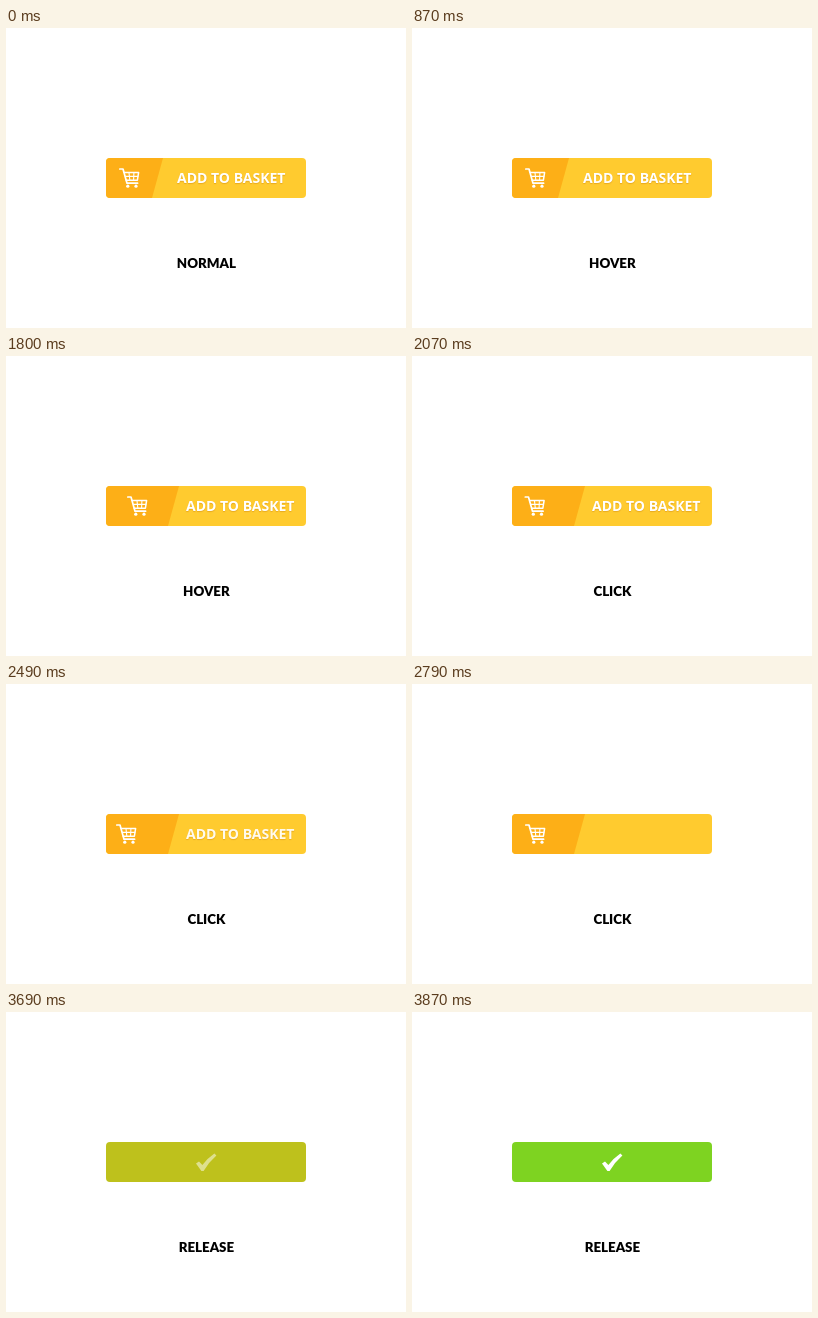
Recreate the animation shown at these times as an HTML page. Size 400 px wide and 300 px high, loop 4530 ms.

```html
<!DOCTYPE html>
<html lang="en">
<head>
<meta charset="utf-8">
<title>Add to basket button</title>
<style>
  html, body { margin: 0; width: 100%; height: 100%; overflow: hidden; background: #fff; }
  svg { display: block; width: 400px; height: 300px; }
  #caption { font: 700 14px "Open Sans", sans-serif; fill: #fff; text-shadow: 0 1px 1px rgba(190, 110, 0, .35); }
  #state { font: 900 13.3px Lato, sans-serif; fill: #000; text-anchor: middle; }
  #cart { fill: none; stroke: #fff; stroke-linejoin: round; stroke-linecap: round; }
</style>
</head>
<body>
<svg viewBox="0 0 400 300">
  <defs>
    <clipPath id="shape"><rect x="100" y="130" width="200" height="40" rx="4"/></clipPath>
  </defs>
  <g clip-path="url(#shape)">
    <rect id="base" x="100" y="130" width="200" height="40"/>
    <path id="panel" d="M80 130H157L146 170H80Z" fill="#fdaf17"/>
    <g id="cart">
      <path d="M.8 1H4L8 15.2H18.6" stroke-width="1.7"/>
      <path d="M5.2 4.6H19.6L18.4 12.2H7.2" stroke-width="1.5"/>
      <path d="M6.4 8.4H18.8M10 4.6L10.8 12M14.9 4.6L14.6 12" stroke-width="1.1"/>
      <circle cx="8.8" cy="18.2" r="1.6" fill="#fff" stroke="none"/>
      <circle cx="17" cy="18.2" r="1.6" fill="#fff" stroke="none"/>
    </g>
    <text id="caption" y="155">ADD TO BASKET</text>
    <path id="tick" fill="#fff" d="M190 151.6L193 149.4L196.4 153Q202 145.6 208.4 141.4L210.4 143.6Q203 150 197.6 159H195.4Z"/>
  </g>
  <text id="state" x="200.4" y="240"></text>
</svg>
<script>
  const LOOP = 4530, STEP = 30;
  const YELLOW = [255, 203, 47], ORANGE = [253, 175, 23], GREEN = [126, 211, 33];
  const STATES = [[0, "NORMAL"], [870, "HOVER"], [1830, "CLICK"], [2820, "RELEASE"]];

  const el = id => document.getElementById(id);
  const [base, panel, cart, caption, tick, state] =
    ["base", "panel", "cart", "caption", "tick", "state"].map(el);

  const part = (t, from, to) => Math.min(1, Math.max(0, (t - from) / (to - from)));
  const smooth = p => p * p * (3 - 2 * p);
  const blend = (a, b, p) => `rgb(${a.map((v, i) => Math.round(v + (b[i] - v) * p))})`;
  const move = (node, x, y = 0) => node.setAttribute("transform", `translate(${x} ${y})`);

  // The cart pulls back on click, then accelerates out to the right.
  function cartX(t, hover) {
    const pull = smooth(part(t, 1800, 2190));
    const dash = 3 * Math.pow(Math.max(0, t - 2430) / 360, 8.7);
    return Math.min(320, 113 + 8 * hover - 11 * pull + dash);
  }

  function draw(t) {
    const hover = smooth(part(t, 870, 1350));
    const fill = part(t, 2820, 3120);
    const done = smooth(part(t, 3510, 3870));

    base.setAttribute("fill", done ? blend(ORANGE, GREEN, done) : blend(YELLOW, ORANGE, fill));
    panel.setAttribute("visibility", fill < 1 ? "visible" : "hidden");
    move(panel, 16 * hover);
    move(cart, cartX(t, hover), 140);
    caption.setAttribute("x", 171 + 9 * hover);
    caption.setAttribute("opacity", 1 - smooth(part(t, 2430, 2760)));
    tick.setAttribute("opacity", done);
    state.textContent = STATES.filter(s => s[0] <= t).pop()[1];
  }

  const start = performance.now();
  function tickFrame() {
    const t = Math.max(0, performance.now() - start) % LOOP;
    draw(Math.floor(t / STEP) * STEP);
    requestAnimationFrame(tickFrame);
  }
  tickFrame();
</script>
</body>
</html>
```
